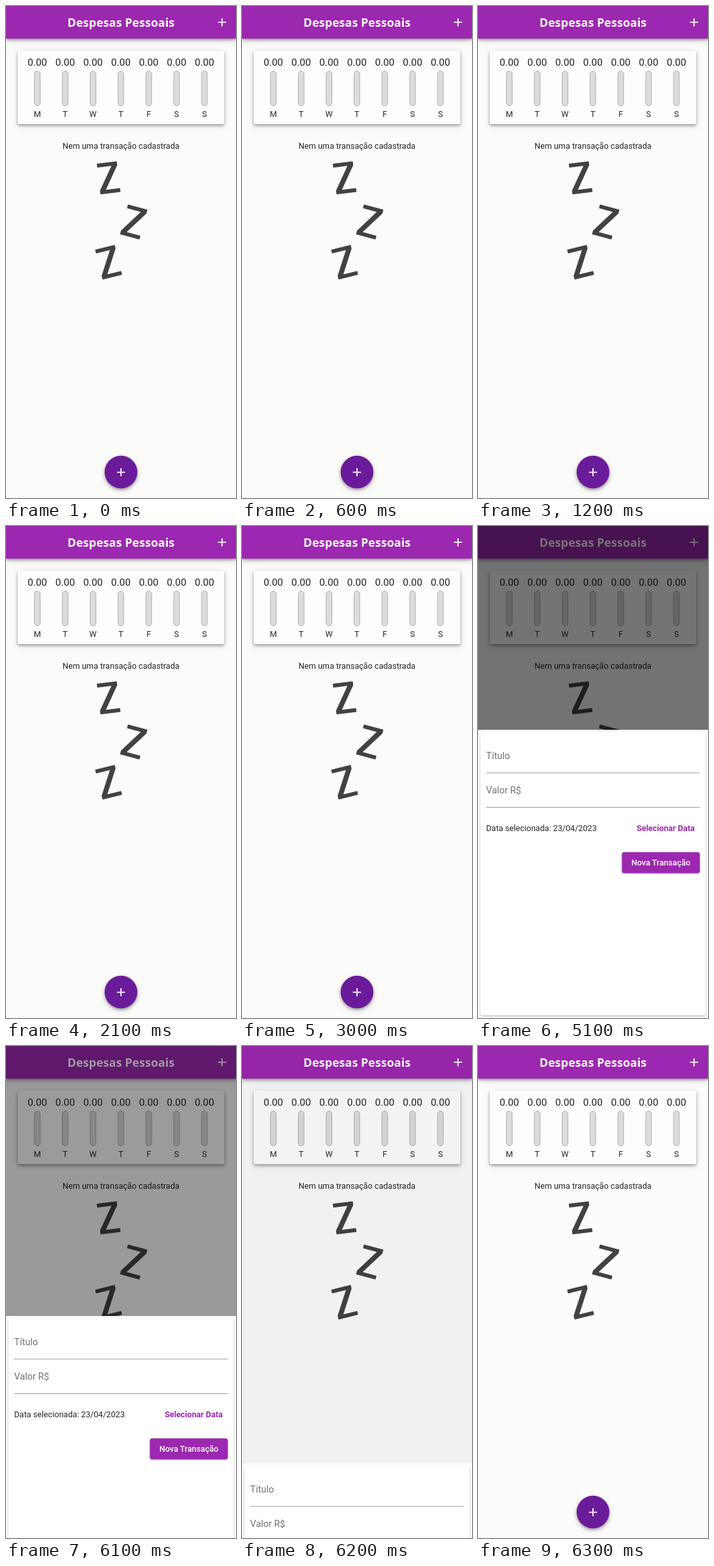
Animation, 354 px wide and 758 px high, one loop 8000 ms. Source, as an HTML page:

```html
<!DOCTYPE html>
<html lang="pt">
<head>
<meta charset="utf-8">
<style>
html, body { margin: 0; width: 100%; height: 100%; overflow: hidden; background: #fff; }
svg { display: block; width: 354px; height: 758px; }
text { font: 12.62px Roboto, sans-serif; fill: #262626; }
.mid { text-anchor: middle; }
.title { font: 700 18.03px "Open Sans", sans-serif; fill: #fff; }
.value { font-size: 15.4px; }
.hint { font-size: 14.42px; fill: #737373; }
.action { font-weight: 700; fill: #9c27b0; }
.button { font-weight: 500; fill: #fff; }
.plus { stroke: #fff; stroke-width: 1.8; }
.bar { fill: #dcdcdc; stroke: #a8a8a8; stroke-width: .9; }
.line { stroke: #919191; stroke-width: .9; }
.raised { filter: drop-shadow(0 2px 2px #0005) drop-shadow(0 3px 4px #0002); }
.flat { filter: drop-shadow(0 1px 1px #0005); }
</style>
</head>
<body>
<svg viewBox="0 0 354 758">
  <defs>
    <path id="plus" class="plus" d="M-6.3 0H6.3M0-6.3V6.3"/>
    <path id="z" fill="#424242" d="M-15.5-24H15.5V-18L-6.5 17.5H15.5V23.5H-15.5V17.5L6.5-18H-15.5Z"/>
  </defs>
  <rect id="page" width="354" height="758"/>
  <rect class="raised" width="354" height="50.3" fill="#9c27b0"/>
  <text class="title mid" x="177" y="31.9">Despesas Pessoais</text>
  <use href="#plus" x="332.5" y="25.2"/>
  <rect class="raised" x="18" y="68.5" width="318" height="113.5" rx="3.6" fill="#fdfdfd"/>
  <g id="chart"></g>
  <text class="mid" x="177" y="219.5">Nem uma transação cadastrada</text>
  <use href="#z" transform="translate(158 265) rotate(-7)"/>
  <use href="#z" transform="translate(196.5 333) rotate(15)"/>
  <use href="#z" transform="translate(158 395) rotate(-14)"/>
  <circle class="raised" cx="177" cy="718" r="25.2" fill="#6a1b9a"/>
  <use href="#plus" x="177" y="718.3"/>
  <rect id="scrim" width="354" height="758"/>
  <g id="sheet">
    <rect width="354" height="444" fill="#fdfdfd"/>
    <rect class="flat" x="3.6" y="3.6" width="346.8" height="436.4" rx="3.6" fill="#fff"/>
    <text class="hint" x="12.6" y="44.5">Título</text>
    <path class="line" d="M12.6 66.3H341.4M12.6 119.5H341.4"/>
    <text class="hint" x="12.6" y="98">Valor R$</text>
    <text x="12.6" y="156">Data selecionada: 23/04/2023</text>
    <text class="action mid" x="288.8" y="156">Selecionar Data</text>
    <rect class="flat" x="221.5" y="188.6" width="119.9" height="32.2" rx="3.6" fill="#9c27b0"/>
    <text class="button mid" x="281.5" y="209.3">Nova Transação</text>
  </g>
</svg>
<script>
const get = id => document.getElementById(id);

get("chart").innerHTML = [..."MTWTFSS"].map((day, i) => {
  const x = 48.2 + i * 42.87;
  return `<text class="value mid" x="${x}" y="92.3">0.00</text>
    <rect class="bar" x="${x - 4.4}" y="100.3" width="8.8" height="53.6" rx="4.4"/>
    <text class="mid" x="${x}" y="171">${day}</text>`;
}).join("");

// start time, sheet top, scrim opacity, page colour
const steps = [
  [0, 758, 0, "#fbfbf9"],
  [5100, 314, .54, "#fbfbfb"],
  [6100, 416, .39, "#fbfbfb"],
  [6200, 643, .04, "#fbfbfb"],
  [6300, 758, 0, "#fcfcfc"]
];

function draw(now) {
  const t = now % 8000;
  const [, top, dim, page] = steps.findLast(s => t >= s[0]);
  get("sheet").setAttribute("transform", `translate(0 ${top})`);
  get("scrim").setAttribute("opacity", dim);
  get("page").setAttribute("fill", page);
}

const start = performance.now();
function tick() {
  draw(performance.now() - start);
  requestAnimationFrame(tick);
}
tick();
</script>
</body>
</html>
```
